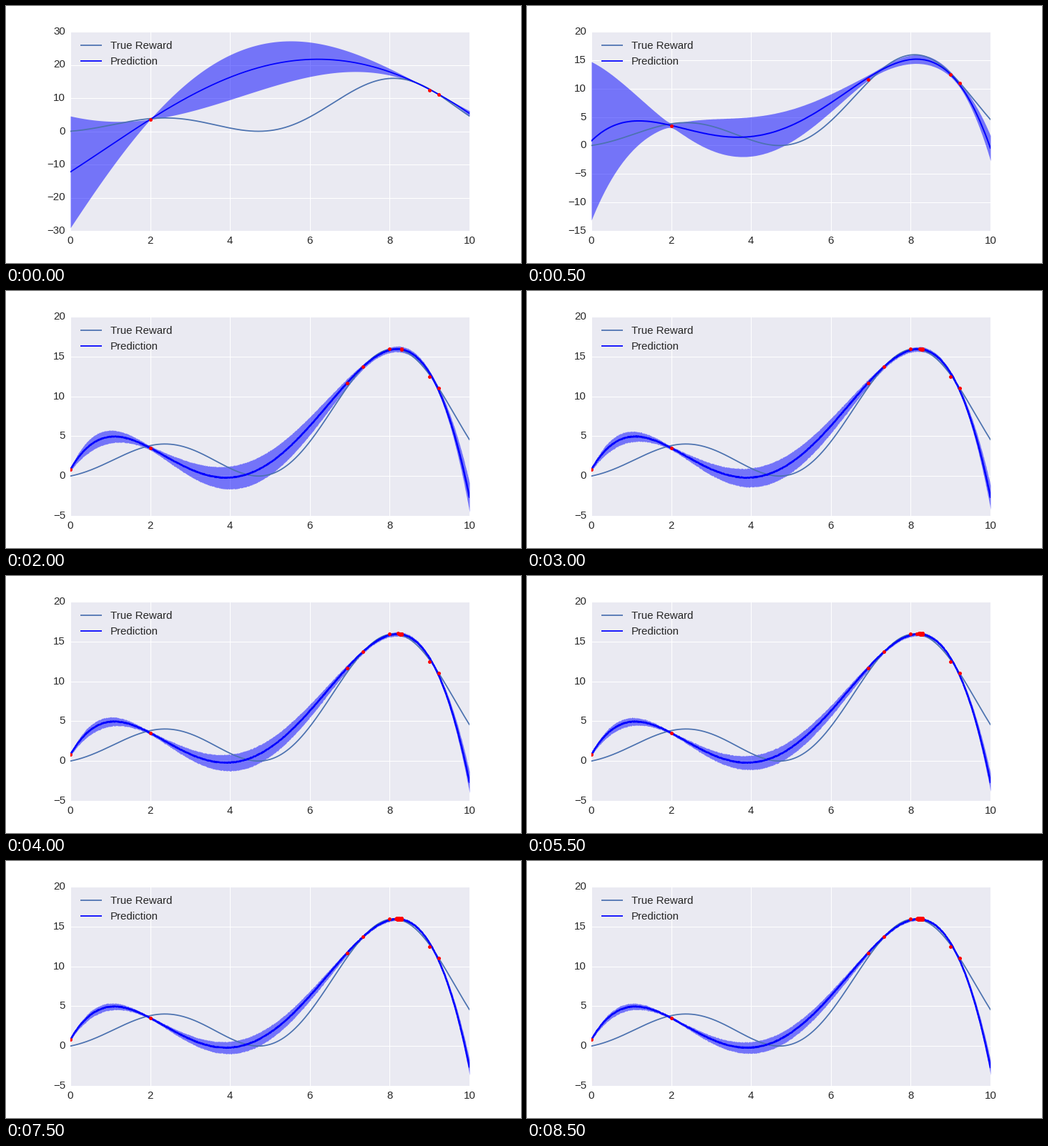
Recreate the animation shown at these times as a matplotlib script. Size 720x360 px, loop 9000 ms.

```python
import numpy as np
import matplotlib.pyplot as plt
from matplotlib.animation import FuncAnimation
from matplotlib.lines import Line2D

W, H, DPI = 720, 360, 72
FRAMES, INTERVAL = 18, 500
INK, STEEL, BLUE = "#262626", "#4C72B0", "#0000FF"

plt.rcParams["font.family"] = "Liberation Sans"
plt.rcParams["font.size"] = 15
plt.rcParams["ytick.alignment"] = "center"
plt.rcParams["lines.solid_capstyle"] = "round"

x = np.linspace(0, 10, 1000)


def hill(turns, scale, start=.8):
    """Quartic that is level at the three turning points."""
    return np.polyval(np.polyint(-scale * np.poly(turns), k=start), x)


def spread(roots, gain, noise):
    """Half width of the band, pinched where samples lie."""
    return np.hypot(gain * np.polyval(np.poly(roots), x), noise)


def model(i):
    """Mean and half width of the prediction at step i."""
    if i == 0:
        mean = np.polyval([.0059, -.0105, -1.175, 0, 21.7], x - 6.2)
        gain = .134 - .00075 * (x - 6.6) ** 2
        return mean, spread([2, 9, 9.23], gain, .15)
    if i < 3:
        mean = hill([1.19, 3.68, 8.15], .195)
        if i == 1:
            return mean, spread([2, 7.13, 9.12], .107, .4)
        return mean, spread([0, 2, 7.3, 9.1], .0162, .4)
    shrink = (4 / i) ** .47
    gain = .0094 * (1 + 1.2 * np.exp(-x / 1.2))
    return (hill([1.1, 3.9, 8.19], .248),
            spread([0, 2, 7.6, 9], gain * shrink, .27 * shrink))


# a few scattered samples, then a cluster around the best value
rng = np.random.default_rng(4)
scattered = [(2, 3.5), (9, 12.45), (9.23, 11), (6.94, 11.65), (7.33, 13.7),
             (0, .8), (8, 15.95)]
cluster = rng.uniform([8.13, 15.83], [8.3, 16.1], (25, 2))
samples = np.vstack([scattered, cluster])

fig = plt.figure(figsize=(W / DPI, H / DPI), dpi=DPI, facecolor="white")
ax = fig.add_axes([.125, .125, .775, .775], facecolor="#EAEAF2")
for side in ax.spines.values():
    side.set_visible(False)
ax.set_axisbelow(True)
ax.grid(True, color="white", lw=1, ls="-")
ax.tick_params(length=0, pad=7, labelcolor=INK)
ax.set_xlim(0, 10)
ax.set_xticks(range(0, 11, 2))

band = ax.fill_between(x, x, x, color=BLUE, alpha=.5, lw=0)
ax.plot(x, x * (1 + np.sin(x)), color=STEEL, lw=1.75)
line, = ax.plot([], [], color=BLUE)
dots, = ax.plot([], [], "o", color="red", ms=5, mew=0, zorder=4)


def legend_row(y, color, label):
    fig.add_artist(Line2D([104 / W, 134 / W], [1 - y / H] * 2, color=color,
                          lw=1.75, solid_capstyle="butt"))
    fig.text(145.5 / W, 1 - (y + 5) / H, label, color=INK, va="baseline")


legend_row(55, STEEL, "True Reward")
legend_row(77, BLUE, "Prediction")


def draw(i):
    # the fit gets slightly noisy as samples crowd together
    mean, half = model(i)
    jitter = .008 * min(i, 5)
    noise = np.random.default_rng(i).uniform(-jitter, jitter, (3, x.size))
    mean = mean + noise[0]
    top = mean + half + noise[1]
    low = mean - half + noise[2]

    step = 10 if top.max() - low.min() > 40 else 5
    lo = step * int(np.floor(low.min() / step))
    hi = step * int(np.ceil(top.max() / step))
    ax.set_ylim(lo, hi)
    ax.set_yticks(range(lo, hi + 1, step))

    band.set_verts([np.column_stack([np.r_[x, x[::-1]],
                                     np.r_[top, low[::-1]]])])
    line.set_data(x, mean)
    line.set_linewidth(1.75 + .2 * min(i, 4))
    dots.set_data(*samples[:3 + int(1.6 * i)].T)
    return band, line, dots


anim = FuncAnimation(fig, draw, frames=FRAMES, interval=INTERVAL,
                     repeat=True, repeat_delay=0, blit=False)
plt.show()
```
